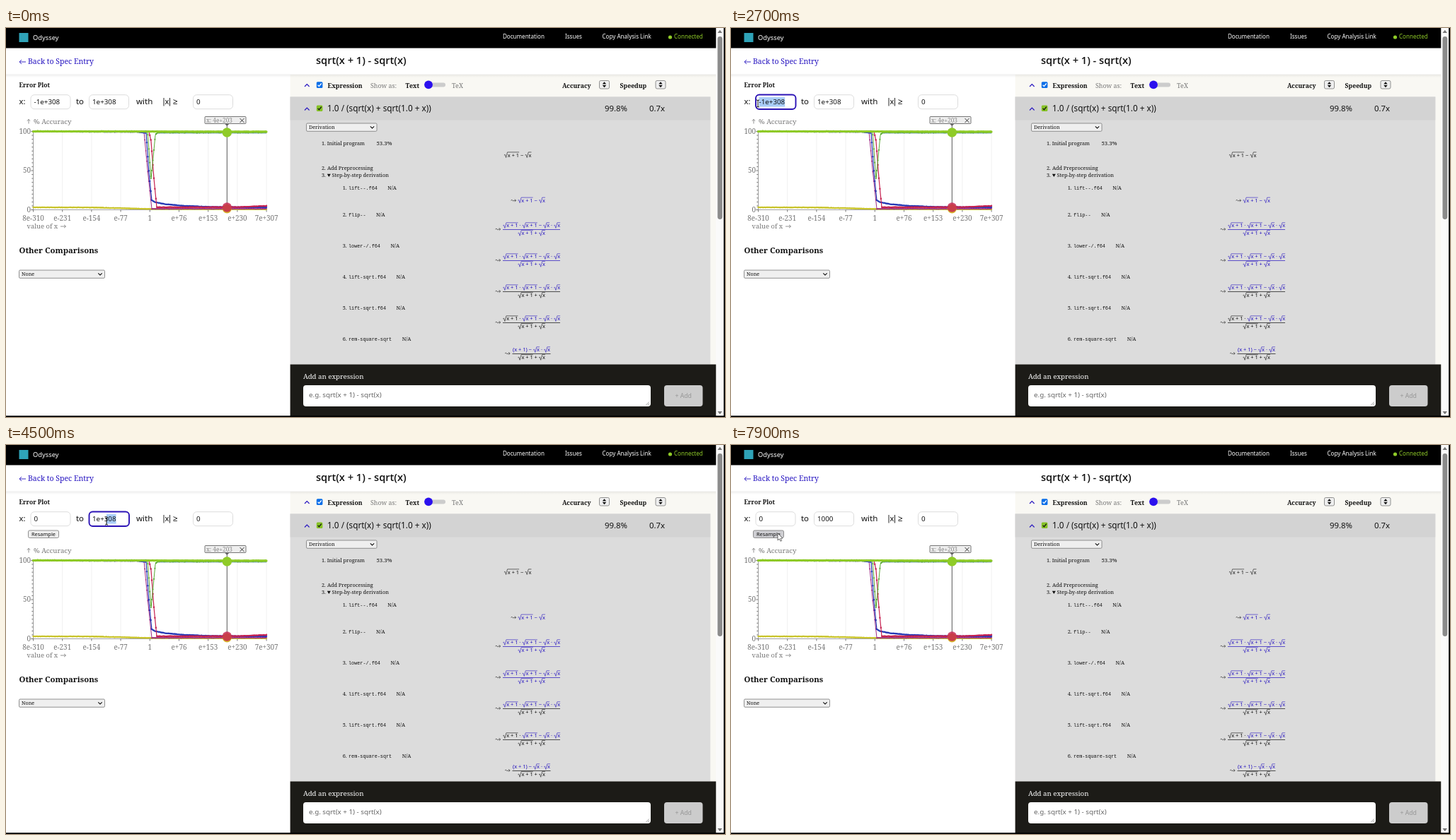
Write an HTML page with a canvas that moves like this. It is 1016 px wide and 551 px high and loops after 8 s.

```html
<!DOCTYPE html>
<html lang="en">
<head>
<meta charset="utf-8">
<title>Error plot</title>
<style>
html, body { margin: 0; width: 100%; height: 100%; overflow: hidden; background: #fff; }
canvas { display: block; width: 1016px; height: 551px; }
</style>
</head>
<body>
<canvas id="stage"></canvas>
<script>
const W = 1016, H = 551, LOOP = 8000, STEP = 100;
const canvas = document.getElementById('stage');
const ctx = canvas.getContext('2d');
const ratio = window.devicePixelRatio || 1;
canvas.width = W * ratio;
canvas.height = H * ratio;
ctx.scale(ratio, ratio);

const SANS = '"Noto Sans", sans-serif', SERIF = '"Noto Serif", serif', MONO = '"Liberation Mono", monospace';
const HEADING = '"Open Sans", sans-serif';
const BLUE = '#2412c0', INK = '#111', GRAY = '#777';
const LIME = '#8fcb28';
const PANEL = 401.6, SCROLLBAR = 1003.5;

function text(s, x, y, size, color = INK, family = SERIF, weight = 400, align = 'left') {
  ctx.font = `${weight} ${size}px ${family}`;
  ctx.textAlign = align;
  ctx.fillStyle = color;
  ctx.fillText(s, x, y);
}

function rect(x, y, w, h, color) {
  ctx.fillStyle = color;
  ctx.fillRect(x, y, w, h);
}

function box(x, y, w, h, r, fill, stroke, width = 1) {
  ctx.beginPath();
  ctx.roundRect(x, y, w, h, r);
  if (fill) { ctx.fillStyle = fill; ctx.fill(); }
  if (stroke) { ctx.strokeStyle = stroke; ctx.lineWidth = width; ctx.stroke(); }
}

function line(points, color, width = 1) {
  ctx.beginPath();
  points.forEach(([x, y]) => ctx.lineTo(x, y));
  ctx.strokeStyle = color;
  ctx.lineWidth = width;
  ctx.stroke();
}

function shape(points, color) {
  ctx.beginPath();
  points.forEach(([x, y]) => ctx.lineTo(x, y));
  ctx.closePath();
  ctx.fillStyle = color;
  ctx.fill();
}

function disc(x, y, r, color) {
  ctx.beginPath();
  ctx.arc(x, y, r, 0, Math.PI * 2);
  ctx.fillStyle = color;
  ctx.fill();
}

// Piecewise linear lookup: rows start with the key, the rest are values.
function lookup(rows, key) {
  const i = rows.findIndex(row => row[0] >= key);
  if (i < 0) return rows[rows.length - 1].slice(1);
  if (i === 0) return rows[0].slice(1);
  const a = rows[i - 1], b = rows[i], p = (key - a[0]) / (b[0] - a[0]);
  return a.slice(1).map((v, n) => v + (b[n + 1] - v) * p);
}

function noise(n) {
  const v = Math.sin(n * 12.9898) * 43758.5453;
  return v - Math.floor(v) - 0.5;
}

// ---- formulas ----
const MATH = 7.4;
const root = s => ({ root: s }), plain = s => ({ s });
const ROOT1 = root('x + 1'), ROOTX = root('x');
const MINUS = plain(' − '), DOT = plain(' · '), PLUS = plain(' + ');
const DIFF = [ROOT1, MINUS, ROOTX], SUM = [ROOT1, PLUS, ROOTX];
const PRODUCT = [ROOT1, DOT, ROOT1, MINUS, ROOTX, DOT, ROOTX];
const REDUCED = [plain('(x + 1)'), MINUS, ROOTX, DOT, ROOTX];

function partWidth(part) {
  ctx.font = `${MATH}px ${SANS}`;
  return part.root ? 5.3 + ctx.measureText(part.root).width : ctx.measureText(part.s).width;
}

function formula(parts, cx, y, color, darkCount = 0) {
  const total = parts.reduce((sum, p) => sum + partWidth(p), 0);
  let x = cx - total / 2;
  parts.forEach((part, i) => {
    const tint = i < darkCount ? INK : color, w = partWidth(part);
    if (part.root) {
      line([[x + 0.3, y - 2.5], [x + 1.6, y - 3.2], [x + 3, y + 1], [x + 5, y - 6.6], [x + w, y - 6.6]], tint, 0.6);
      text(part.root, x + 5.3, y, MATH, tint, SANS);
    } else {
      text(part.s, x, y, MATH, tint, SANS);
    }
    x += w;
  });
}

function squiggle(x, y) {
  line([[x, y], [x + 1.5, y - 1], [x + 3, y + 0.8], [x + 4.5, y], [x + 7, y]], '#333', 0.7);
  line([[x + 5.3, y - 1.6], [x + 7.2, y], [x + 5.3, y + 1.6]], '#333', 0.7);
}

function fraction(top, bottom, cx, y, topColor, bottomColor, half, darkCount) {
  squiggle(cx - half - 10.5, y);
  formula(top, cx, y - 2.6, topColor, darkCount);
  line([[cx - half, y + 0.5], [cx + half, y + 0.5]], bottomColor, 0.7);
  formula(bottom, cx, y + 8.3, bottomColor);
}

// ---- page parts ----
function select(label, x, y, w) {
  box(x + 0.5, y + 0.5, w, 11.3, 1.5, '#efefef', '#777', 0.8);
  text(label, x + 4, y + 8.8, 7.2);
  const cx = x + w - 6;
  line([[cx - 2.7, y + 4.8], [cx, y + 7.5], [cx + 2.7, y + 4.8]], INK, 1.1);
}

function checkbox(x, y, fill, tick) {
  box(x, y, 8.6, 8.6, 1.5, fill);
  line([[x + 1.8, y + 4.4], [x + 3.6, y + 6.3], [x + 6.9, y + 2.2]], tick, 1.3);
}

function chevron(y) {
  line([[422, y + 2], [425.3, y - 1.5], [428.6, y + 2]], BLUE, 1.1);
}

function sorter(x) {
  box(x, 74.5, 14, 11.5, 2, '#efefef', '#777', 0.8);
  shape([[x + 4.3, 79.5], [x + 7, 76.2], [x + 9.7, 79.5]], INK);
  shape([[x + 4.3, 81], [x + 7, 84.3], [x + 9.7, 81]], INK);
}

function header() {
  rect(0, 0, SCROLLBAR, 28.5, '#000');
  rect(18.5, 7, 13, 13, '#2fa3b8');
  text('Odyssey', 38, 16.5, 9.3, '#fff', SANS);
  text('Documentation', 702, 15.3, 8.05, '#fff', SANS);
  text('Issues', 790, 15.3, 8.05, '#fff', SANS);
  text('Copy Analysis Link', 842.5, 15.3, 8.05, '#fff', SANS);
  disc(938.5, 13, 2.6, LIME);
  text('Connected', 944, 15.3, 8.05, LIME, SANS);

  line([[28, 48], [19, 48]], BLUE, 0.9);
  line([[22, 45], [19, 48], [22, 51]], BLUE, 0.9);
  text('Back to Spec Entry', 31, 51.2, 10.5, BLUE);
  text('sqrt(x + 1) - sqrt(x)', 438, 51, 14.6, INK, HEADING, 600);
}

function headerShadow() {
  const fade = ctx.createLinearGradient(0, 65.5, 0, 70);
  fade.addColorStop(0, 'rgba(0, 0, 0, .07)');
  fade.addColorStop(1, 'rgba(0, 0, 0, 0)');
  rect(0, 65.5, SCROLLBAR, 4.5, fade);
}

function rightPanel() {
  rect(PANEL, 66, SCROLLBAR - PANEL, 484, '#f9f8f3');
  rect(PANEL, 97.5, 995.3 - PANEL, 379, '#dcdcdc');
  rect(PANEL, 97.5, 995.3 - PANEL, 33, '#d3d3d3');
  chevron(81);
  checkbox(438.8, 76.3, '#0b6fe8', '#fff');
  text('Expression', 454.5, 84.5, 8.7, INK, SERIF, 700);
  text('Show as:', 515, 84.5, 8.9, GRAY);
  text('Text', 564.5, 84.5, 8.7, INK, SERIF, 700);
  box(597, 77.5, 24, 6, 3, '#ccc');
  disc(597, 80.3, 5.9, '#2b10ee');
  text('TeX', 630, 84.5, 9, GRAY);
  text('Accuracy', 786, 84.5, 8.7, INK, SERIF, 700);
  sorter(838.5);
  text('Speedup', 867.5, 84.5, 8.7, INK, SERIF, 700);
  sorter(918);

  chevron(114.5);
  checkbox(438.8, 109.5, '#86c226', '#111');
  text('1.0 / (sqrt(x) + sqrt(1.0 + x))', 454, 118, 11.75, INK, SANS);
  text('99.8%', 846, 118, 11.4, INK, SANS);
  text('0.7x', 909, 118, 11.4, INK, SANS);

  select('Derivation', 424, 134.5, 99.5);
  text('1.', 446, 166, 7.3);
  text('Initial program', 453.7, 166, 7.3);
  text('53.3%', 523.5, 166, 7.8);
  formula(DIFF, 723, 182.5, INK);
  text('2.', 446, 200.5, 7.3);
  text('Add Preprocessing', 454, 200.5, 7.3);
  text('3.', 446, 211.2, 7.3);
  shape([[453.8, 206.7], [458.8, 206.7], [456.3, 211]], INK);
  text('Step-by-step derivation', 460.5, 211.2, 7.3);

  const steps = [['lift--.f64', 226], ['flip--', 264], ['lower-/.f64', 308],
    ['lift-sqrt.f64', 352], ['lift-sqrt.f64', 396], ['rem-square-sqrt', 440]];
  steps.forEach(([name, y], i) => {
    text(i + 1 + '.', 475.7, y + 2.8, 7.3);
    text(name, 484, y + 2.5, 6.8, INK, MONO);
    text('N/A', 484 + name.length * 4.08 + 14.5, y + 2.8, 7.2);
  });
  squiggle(713.5, 244.3);
  formula(DIFF, 742.5, 246.7, BLUE);
  fraction(PRODUCT, SUM, 742.5, 285, BLUE, BLUE, 40.5);
  fraction(PRODUCT, SUM, 742.5, 329, BLUE, BLUE, 40.5);
  fraction(PRODUCT, SUM, 742.5, 373, BLUE, INK, 40.5);
  fraction(PRODUCT, SUM, 742.5, 417, BLUE, INK, 40.5, 2);
  fraction(REDUCED, SUM, 742.5, 461, BLUE, INK, 27);

  rect(PANEL, 476.5, SCROLLBAR - PANEL, 75, '#1c1b17');
  text('Add an expression', 420, 496.7, 9.7, '#fff');
  box(420, 506, 491, 30, 4, '#fff');
  text('e.g. sqrt(x + 1) - sqrt(x)', 428, 523.3, 9.8, '#666', SANS);
  line([[904.5, 534], [909, 529.5]], '#777', 0.7);
  line([[907, 534], [909, 532]], '#777', 0.7);
  box(930, 506, 54.5, 30, 4, '#ccc');
  text('+ Add', 957.2, 523.8, 8.7, '#969696', SANS, 400, 'center');
}

function frameEdges() {
  rect(SCROLLBAR, 0, W - SCROLLBAR, H, '#fafafa');
  box(1005.5, 12, 6.8, 259, 3.4, '#8b8b8b');
  shape([[1005.5, 7], [1008.8, 2.8], [1012, 7]], '#777');
  shape([[1005.5, 543], [1008.8, 547.2], [1012, 543]], '#777');
  rect(1014.2, 0, 2, H, '#000');
  rect(0, 549.2, W, 2, '#000');
}

function series(points, color, dotSize, jitter, lineWidth = 1) {
  line(points, color, lineWidth);
  for (let i = 0; i <= 230; i++) {
    const x = 38.5 + i * 329.5 / 230;
    disc(x, lookup(points, x)[0] + noise(i + dotSize) * jitter, dotSize, color);
  }
}

function chart() {
  line([[32, 135.5], [32, 129.5]], GRAY, 0.8);
  line([[30, 131.7], [32, 129.3], [34, 131.7]], GRAY, 0.8);
  text('% Accuracy', 39, 135.7, 9.7, GRAY);
  ['100', '50', '0'].forEach((s, i) => text(s, 35, 149.7 + i * 55.6, 9.9, GRAY, SERIF, 400, 'right'));

  const labels = ['8e-310', 'e-231', 'e-154', 'e-77', '1', 'e+76', 'e+153', 'e+230', '7e+307'];
  labels.forEach((s, i) => {
    const x = 38.5 + i * 41.2;
    line([[x, 146.5], [x, 257.5]], '#ececec', 0.8);
    line([[x, 257.5], [x, 260.5]], '#555', 0.8);
    text(s, x, 272.5, 9.9, GRAY, SERIF, 400, 'center');
  });
  for (let i = 0; i <= 20; i++) {
    const y = 146.5 + i * 5.55;
    line([[i % 10 ? 36.3 : 35.3, y], [38.5, y]], '#444', 0.7);
  }
  line([[38.5, 146.5], [38.5, 257.5], [368, 257.5]], '#777', 0.7);

  series([[38, 254], [125, 254.3], [203, 256.3], [368, 256.8]], '#c9c42a', 1.2, 0.4, 1.6);
  series([[38, 146.5], [195, 147], [200, 200], [206, 256], [368, 256]], '#a02a86', 0.9, 0.8);
  series([[38, 146.5], [186, 147.2], [198, 148.5], [202, 205], [206, 244], [211, 246.8], [225, 249.5], [250, 251.8], [290, 253.5], [368, 254]],
    '#2438b5', 1.2, 0.4, 1.2);
  series([[38, 146.5], [202, 146.5], [205, 160], [209, 213], [213, 253.8], [320, 253.8], [368, 252]], '#c5204f', 1.2, 0.6, 1.2);
  line([[213, 148.8], [368, 148.8]], '#3a76a0', 1);
  series([[38, 146.5], [200, 146.5], [205, 214], [211, 152], [214, 147.8], [368, 147.8]], '#58a832', 1.1, 1.4);
  series([[38, 146.4], [368, 146.9]], LIME, 1.6, 0.5, 2.4);

  line([[312.3, 137], [312.3, 257]], '#555', 1);
  disc(312.3, 256, 6.5, '#d7b52c');
  disc(312.3, 254, 6.7, 'rgba(196, 35, 79, .82)');
  disc(312.3, 148, 6.7, LIME);
  box(281, 125.5, 58, 10, 1, '#eee', '#555', 0.8);
  shape([[309, 135.5], [312.3, 139], [315.6, 135.5]], '#666');
  text('x: 4e+203', 283, 133.5, 8.3, '#888');
  line([[330.5, 128], [336.5, 134]], '#222', 0.9);
  line([[336.5, 128], [330.5, 134]], '#222', 0.9);

  text('value of x', 29.5, 284.2, 9.4, GRAY);
  line([[77, 281], [84.5, 281]], GRAY, 0.8);
  line([[82, 278.8], [84.5, 281], [82, 283.2]], GRAY, 0.8);
  text('Other Comparisons', 18.5, 319.3, 11.35, INK, SERIF, 700);
  select('None', 18, 342.5, 121);
}

function field(x, value, focused, selectFrom) {
  if (focused) box(x, 94.5, 56.5, 20.5, 5, '#fff', '#2b12b5', 1.9);
  else box(x, 94.7, 56, 20, 5, '#fff', '#d9d9d9', 0.9);
  ctx.font = `9.8px ${SANS}`;
  const left = x + 4.5, right = left + ctx.measureText(value).width;
  if (focused && selectFrom < right) {
    const from = Math.max(left, selectFrom);
    rect(from, 98, right - from, 13.5, '#a9cdf8');
  }
  text(value, left, 108.2, 9.8, INK, SANS);
  if (focused && !(selectFrom < right)) rect(right + 0.3, 98.5, 0.9, 12.5, INK);
}

function controls(t, mouse) {
  text('Error Plot', 18.5, 84, 8.5, INK, SERIF, 700);
  text('x:', 18.5, 108.2, 11.2, INK, SANS);
  text('to', 99, 108.2, 11.4, INK, SANS);
  text('with', 184, 108.2, 11.6, INK, SANS);
  line([[223, 99], [223, 110.5]], INK, 0.9);
  text('x', 224.5, 108.2, 11, INK, SANS);
  line([[231.5, 99], [231.5, 110.5]], INK, 0.9);
  text('≥', 236, 108.2, 11.4, INK, SANS);

  const first = t < 3300 ? '-1e+308' : '0';
  const second = t < 5300 ? '1e+308' : t < 5700 ? '1' : t < 6000 ? '100' : '1000';
  const dragging1 = t >= 2400 && t < 3300, dragging2 = t >= 4500 && t < 5300;
  field(35, first, t >= 2300 && t < 4400, dragging1 ? mouse[0] : Infinity);
  field(117.5, second, t >= 4400 && t < 6500, dragging2 ? mouse[0] : Infinity);
  field(264.5, '0', false);
}

function resampleButton(t) {
  const fill = t >= 7900 ? '#cfcfd3' : t >= 7100 ? '#dedee2' : '#efefef';
  box(31.5, 121, 43, 10.5, 2, fill, '#777', 0.8);
  text('Resample', 53, 129, 7.4, INK, SANS, 400, 'center');
}

// ---- pointer ----
const PATH = [
  [1200, 745, 360], [1400, 480, 268], [1600, 235, 178], [1800, 105, 122], [2000, 76.5, 111],
  [2300, 76.5, 108], [2400, 73, 108], [2600, 46, 107], [2800, 30, 107], [3400, 30, 107],
  [3500, 74, 93], [3600, 123, 86], [3700, 159.5, 89.5], [3900, 168, 99], [4300, 157, 107],
  [4400, 156, 107], [4600, 128, 109], [4800, 103, 112], [6700, 103, 112],
  [6800, 96, 115], [7000, 73, 124], [7400, 66, 125]
];

function pointer(t, [x, y]) {
  const inField = y > 94 && y < 115 && ((x > 35 && x < 91) || (x > 117 && x < 174));
  const dragging = t >= 2400 && t < 3500;
  if (inField || dragging) {
    line([[x - 2, y - 5.2], [x, y - 4.4], [x + 2, y - 5.2]], INK, 1);
    line([[x, y - 4.4], [x, y + 4.4]], INK, 1);
    line([[x - 2, y + 5.2], [x, y + 4.4], [x + 2, y + 5.2]], INK, 1);
    return;
  }
  const outline = [[0, 0], [0, 10], [2.3, 8], [4, 11.3], [5.6, 10.5], [4, 7.3], [7, 7], [0, 0]]
    .map(([dx, dy]) => [x + dx, y + dy]);
  shape(outline, '#fff');
  line(outline, '#444', 0.8);
}

function draw(t) {
  const mouse = lookup(PATH, t), open = t >= 3700;
  rect(0, 0, W, H, '#fff');
  header();
  controls(t, mouse);
  ctx.save();
  if (open) ctx.translate(0, 17);
  chart();
  ctx.restore();
  if (open) resampleButton(t);
  rightPanel();
  headerShadow();
  frameEdges();
  if (t >= 1200) pointer(t, mouse);
}

const start = performance.now();
let shown = -1;
function tick() {
  const t = Math.floor((performance.now() - start) % LOOP / STEP) * STEP;
  if (t !== shown) draw(shown = t);
  requestAnimationFrame(tick);
}
tick();
</script>
</body>
</html>
```
